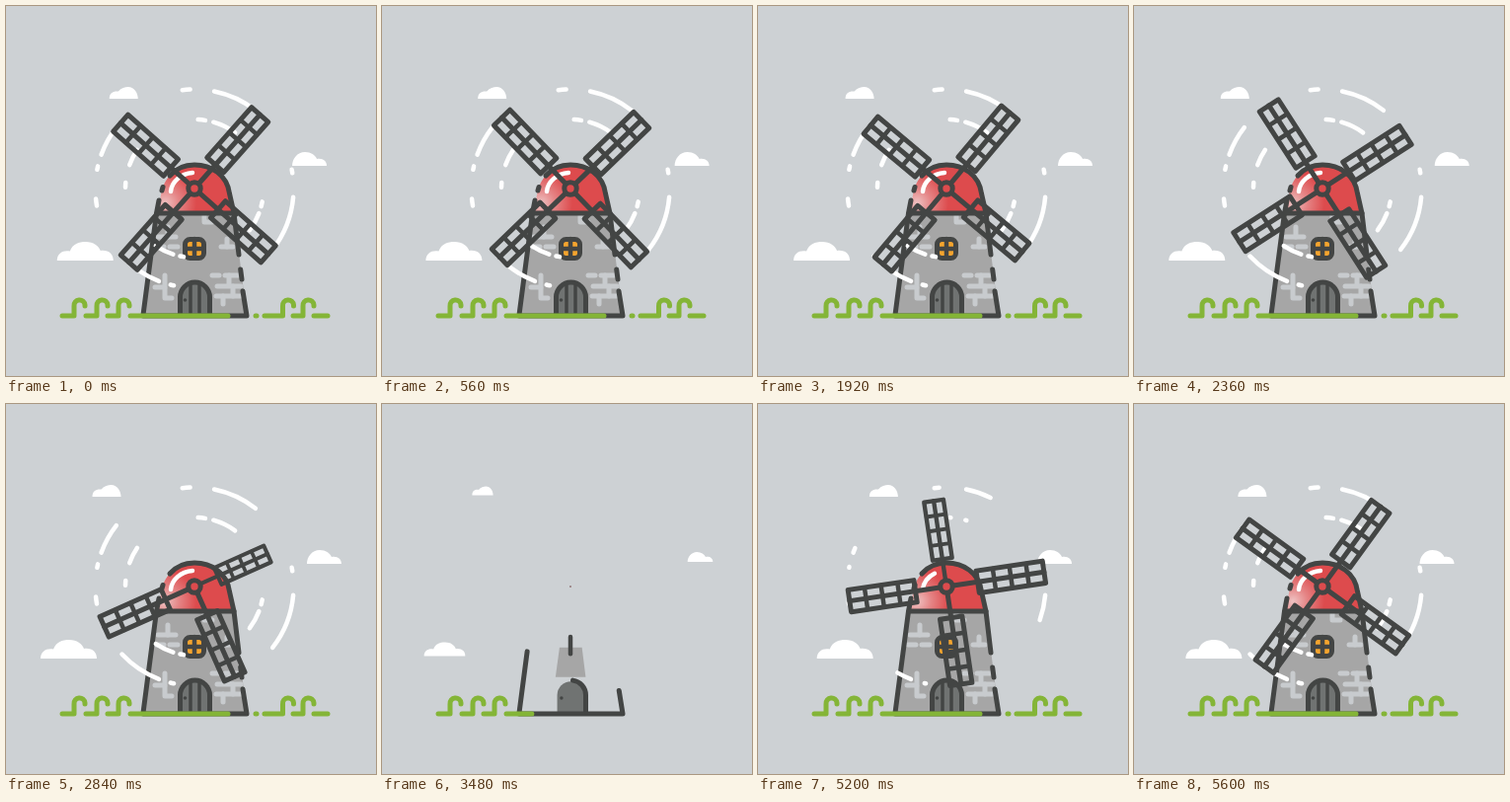
An HTML page that plays this animation: 375x375 px, repeating every 5.64 s.

```html
<!DOCTYPE html>
<html lang="en">
<head>
<meta charset="utf-8">
<title>Windmill</title>
<style>
  html, body { margin: 0; width: 100%; height: 100%; overflow: hidden; background: #cdd1d4; }
  svg { display: block; width: 100vw; height: 100vh; }
  .line { fill: none; stroke-width: 5; stroke-linecap: round; stroke-linejoin: round; }
  .thin { stroke-width: 3.5; }
  .bar { stroke-width: 4.5; }
  .dark { stroke: #434544; }
  .green { stroke: #84b537; }
  .brick { stroke: #c8cbce; }
  .white { stroke: #fff; stroke-width: 4.5; }
</style>
</head>
<body>
<!-- data-t: appear from, appear to, vanish from, vanish to (ms) -->
<svg viewBox="0 0 375 375">
  <defs>
    <radialGradient id="shine" gradientUnits="userSpaceOnUse" cx="161" cy="200" r="32">
      <stop offset="0" stop-color="#efc3c3"/>
      <stop offset=".45" stop-color="#e58586"/>
      <stop offset="1" stop-color="#dd4b4d"/>
    </radialGradient>
    <g id="sail" class="line dark">
      <path d="M0 -7V-100"/>
      <path d="M-11.300 -32H11.300V-100H-11.300Z"/>
      <path d="M-11 -49H11M-11 -66H11M-11 -83H11" stroke-width="4.500"/>
    </g>
  </defs>

  <g fill="#fff">
    <path class="cloud" data-c="35 239 57 19 1" d="M0 19C0 11 7 8 13 9.500C16 2 22 0 29 0C37 0 42 4 44 9C52 8 57 12 57 19Z"/>
    <path class="cloud" data-c="87.500 82 29 12 1.030" d="M0 12C0 6 4 4 9 4.500C12 1 16 0 19 0C25 0 29 6 29 12Z"/>
    <path class="cloud" data-c="305 148 35 14 -.89" d="M0 14C0 7 5 0 13 0C19 0 23 3 25 7C31 6 35 9 35 14Z"/>
  </g>

  <path class="grow" data-o="191 262" data-t="4000 4400 3160 3520" fill="#a6a6a6" d="M153 210H231L244 313H139Z"/>
  <g id="bricks"></g>

  <g class="grow" data-o="192 298" data-t="4050 4350 3400 3640">
    <path fill="#707372" d="M177 313V295A14.500 14.500 0 0 1 206 295V313Z"/>
    <circle cx="181.500" cy="298" r="1.800" fill="#434544"/>
  </g>
  <path class="line dark thin" data-t="4480 4680 3100 3350" d="M196 283V311"/>
  <path class="line dark thin" data-t="4700 4880 3060 3300" d="M187 283V311"/>
  <path class="line dark" data-t="4100 4500 3220 3580" d="M206.500 312V295A15 15 0 0 0 176.500 295V312"/>

  <rect class="grow" data-o="191 246" data-t="4350 4600 3120 3420" x="180" y="235" width="22" height="22" rx="6" fill="#f5a42e"/>
  <path class="line dark bar" data-t="4300 4560 3420 3620" d="M191 236V255"/>
  <path class="line dark bar" data-t="4480 4700 3200 3440" d="M200 246H182"/>
  <path class="line dark" data-t="4500 4860 3050 3400" d="M191 236.500H195.500A5 5 0 0 1 200.500 241.500V250.500A5 5 0 0 1 195.500 255.500H186.500A5 5 0 0 1 181.500 250.500V241.500A5 5 0 0 1 186.500 236.500Z"/>

  <path class="grow" data-o="190 199" data-t="4660 4960 3060 3400" fill="url(#shine)" d="M153 210L157 192C160 171 176 161 191 161C208 161 224 171 226.500 190L231 210Z"/>
  <path class="line white" data-t="5000 5300 2880 3060" d="M167 188C168 178 177 170 189 169"/>

  <path class="line dark" data-t="3760 4060 3460 3660" d="M139 314H244L240 289"/>
  <path class="line dark" data-t="3950 4710 3140 3640" d="M139 313L152.500 210L155 197"/>
  <path class="line dark" data-t="4720 4800 3020 3120" d="M158 187L159 183.500"/>
  <path class="line dark" data-t="4720 4800 3020 3120" d="M239 277L237.700 267"/>
  <path class="line dark" data-t="4500 5000 2900 3360" d="M236 252L231 210L226.500 190C224 171 208 161 191 161C181 161 172 165 166 172"/>
  <path class="line dark" data-t="4300 4560 3000 3300" d="M153 210H231"/>

  <g id="grass"></g>
  <g id="wind"></g>
  <g id="sails"></g>
  <g class="grow" data-o="191 185" data-t="4480 4680 3200 3490">
    <circle cx="191" cy="185" r="6.200" fill="#dd4b4d" class="dark" stroke-width="5"/>
  </g>
</svg>
<script>
const LOOP = 5640, HUB = [191, 185];
const NS = 'http://www.w3.org/2000/svg';
const $ = id => document.getElementById(id);

function add(parent, tag, attrs) {
  const el = document.createElementNS(NS, tag);
  for (const k in attrs) el.setAttribute(k, attrs[k]);
  return parent.appendChild(el);
}
const stroke = (id, kind, d, times) =>
  add($(id), 'path', { class: 'line ' + kind, d, 'data-t': times.join(' ') });

[
  'M164 224V234M154 234H172', 'M152 244H160M166 244H174', 'M201 212V219H209',
  'M224 236V244M218 244H230', 'M161 273V285M151 285H159', 'M161 286V296H168',
  'M209 273H216', 'M222 273H236M226 273V283', 'M214 284H238',
  'M230 284V294M213 294H238', 'M220 294V302'
].forEach((d, i) => d.split(/(?=M)/).forEach(part =>
  stroke('bricks', 'brick', part, [4250 + i * 15, 4420 + i * 15, 2960 + i * 15, 3150 + i * 15])));

const curl = (x, run) => `M${x} 314H${x + run}V304A5.500 5.500 0 0 1 ${x + run + 11} 303V304`;
[
  [curl(57, 12), 3720, 3860, 3600, 3680],
  [curl(81, 11), 3820, 3960, 3560, 3630],
  [curl(103, 11), 3920, 4060, 3510, 3590],
  ['M126 314H225', 4000, 4400, 3120, 3540],
  ['M253 314H254', 4520, 4560, 3240, 3300],
  [curl(262, 18.5), 4560, 4840, 3120, 3260],
  [curl(291, 10), 4800, 4960, 3020, 3140],
  ['M312 314H326', 4940, 5080, 2920, 3040]
].forEach(([d, ...times]) => stroke('grass', 'green', d, times));

// Wind arcs: radius, start and end in degrees clockwise from the top
const polar = (r, deg) => {
  const a = deg * Math.PI / 180;
  return (HUB[0] + r * Math.sin(a)).toFixed(2) + ' ' + (HUB[1] - r * Math.cos(a)).toFixed(2);
};
[
  [100.5, -7, -2.5], [100.5, 11.5, 38], [100.5, 79, 81], [100.5, 95, 128],
  [100.5, 192, 194], [100.5, 201, 227], [100.5, 260, 264], [100.5, 281, 283], [100.5, 290, 308],
  [70, 3, 9], [70, 16, 36], [70, 101, 105], [70, 111, 127],
  [70, 189, 192], [70, 198, 214], [70, 271, 275], [70, 290, 304]
].forEach(([r, a, b], i) => stroke('wind', 'white',
  `M${polar(r, a)}A${r} ${r} 0 0 1 ${polar(r, b)}`,
  [5040 + i * 15, 5300 + i * 15, 2880 + i * 15, 3120 + i * 15]));

const sails = [0, 1, 2, 3].map(i => {
  const start = 4640 + (i + 3) % 4 * 120, end = 2540 + i * 140;
  return { el: add($('sails'), 'use', { href: '#sail' }), times: [start, start + 400, end, end + 280] };
});

const parts = [...document.querySelectorAll('[data-t]')].map(el => {
  const grow = el.classList.contains('grow');
  if (!grow) el.setAttribute('pathLength', 1);
  return {
    el, grow,
    times: el.dataset.t.split(' ').map(Number),
    origin: grow && el.dataset.o.split(' ').map(Number)
  };
});
const clouds = [...document.querySelectorAll('.cloud')].map(el =>
  ({ el, box: el.dataset.c.split(' ').map(Number) }));

function presence(t, [inA, inB, outA, outB], grow) {
  if (t < outA || t >= inB) return 1;
  if (t < outB) return 1 - ((t - outA) / (outB - outA)) ** (grow ? 3 : 2);
  if (t < inA) return 0;
  const u = (t - inA) / (inB - inA);
  return grow ? 1 - (1 - u) ** 3 : u;
}

const show = (el, p) => { el.style.visibility = p > 0.002 ? 'visible' : 'hidden'; };

// A little over one turn: slow start, fastest near 580 ms, slow finish
function spin(t) {
  const s = t > 4000 ? t - LOOP : t;
  return 139.5 + 203 * Math.tanh((s - 580) / 1100);
}

function drift(t) {
  const left = (t > 3900 ? LOOP + 3200 - t : 3200 - t) / 1000;
  return Math.max(0, 0.8 * left) ** 3;
}

function draw(t) {
  for (const { el, times, grow, origin } of parts) {
    const p = presence(t, times, grow);
    show(el, p);
    if (grow) {
      const [x, y] = origin;
      el.setAttribute('transform', `translate(${x} ${y}) scale(${p}) translate(${-x} ${-y})`);
    } else {
      el.setAttribute('stroke-dasharray', p === 1 ? 'none' : `${p} 2`);
    }
  }
  const angle = spin(t);
  sails.forEach(({ el, times }, i) => {
    const p = presence(t, times, true);
    show(el, p);
    el.setAttribute('transform', `translate(${HUB}) rotate(${angle + i * 90}) scale(${p})`);
  });
  const size = presence(t, [4120, 4520, 3120, 3680], true), shift = drift(t);
  for (const { el, box: [x, y, w, h, k] } of clouds) {
    show(el, size);
    el.setAttribute('transform',
      `translate(${x + w / 2 + shift * k} ${y + h / 2}) scale(${size}) translate(${-w / 2} ${-h / 2})`);
  }
}

const begin = performance.now();
function tick() {
  draw((performance.now() - begin) % LOOP);
  requestAnimationFrame(tick);
}
tick();
</script>
</body>
</html>
```
